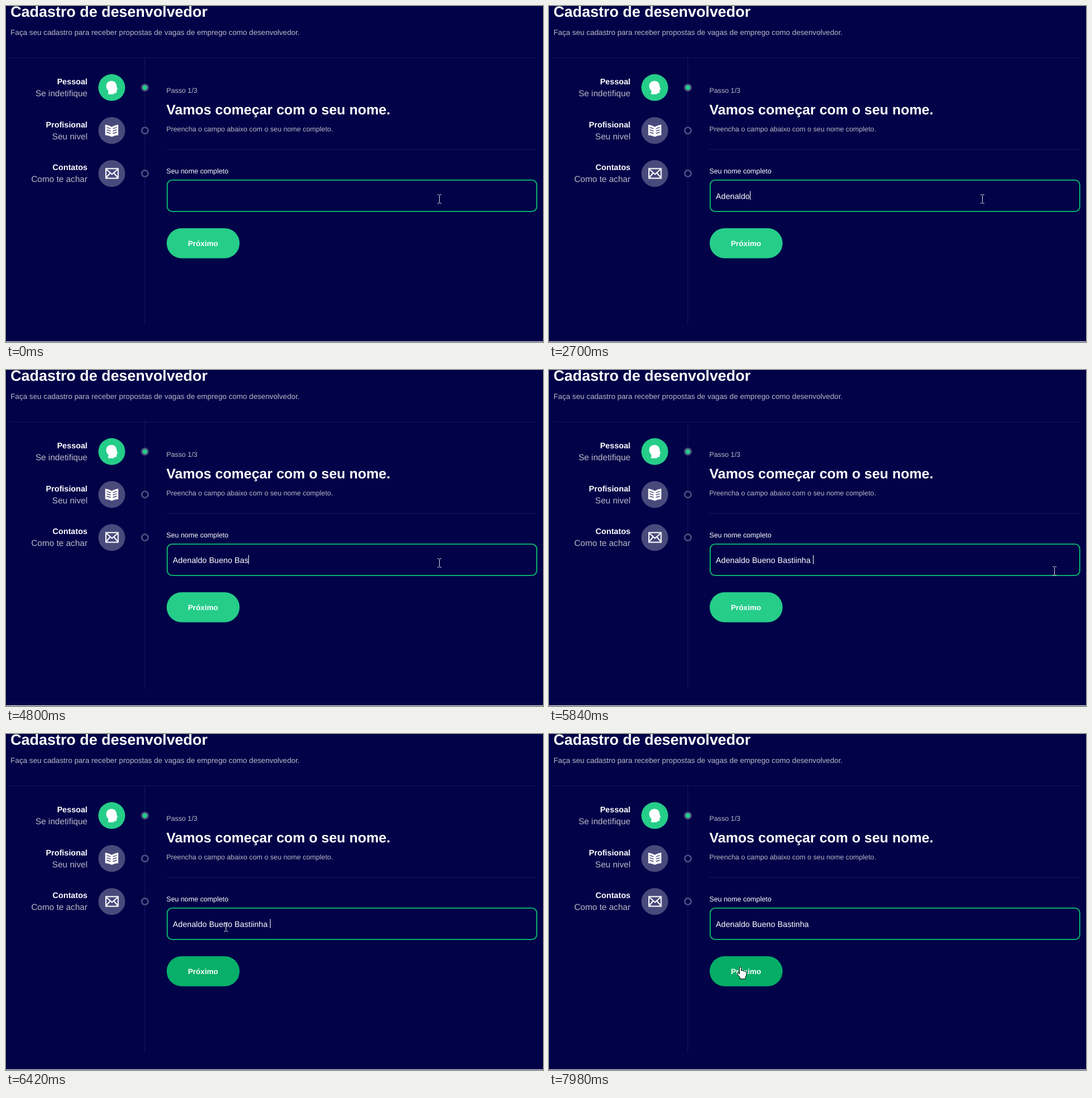
An HTML page that plays this animation: 946 px wide and 592 px high, repeating every 8 s.

```html
<!DOCTYPE html>
<html lang="pt-BR">
<head>
<meta charset="utf-8">
<title>Cadastro</title>
<style>
  html, body { margin: 0; width: 100%; height: 100%; overflow: hidden; background: #010248; }
  svg { display: block; width: 946px; height: 592px; }
  text { font-family: "Liberation Sans", Arial, sans-serif; fill: #fff; white-space: pre; text-rendering: geometricPrecision; }
  .b { font-weight: bold; }
  .soft { fill: #b9b9c6; }
  .end { text-anchor: end; }
  .rule { fill: #16195c; }
</style>
</head>
<body>
<svg viewBox="0 0 946 592">
  <rect width="946" height="592" fill="#010248"/>
  <rect y="591" width="946" height="1" fill="#fff"/>
  <rect class="rule" x="8" y="91" width="928" height="1"/>
  <rect class="rule" x="244" y="92" width="1" height="470"/>
  <rect class="rule" x="283" y="252" width="653" height="1"/>

  <text class="b" x="8" y="19" font-size="26.46">Cadastro de desenvolvedor</text>
  <text class="soft" x="8" y="51" font-size="13.23">Faça seu cadastro para receber propostas de vagas de emprego como desenvolvedor.</text>

  <g id="steps"></g>
  <path fill="#fff" d="M186 132C180 132 176.5 136 176.5 141C176.5 144.500 178 147.500 180.500 149.500L179.800 155.500H190L190.500 153.500H193C194.500 153.500 195 152.500 195 151L195.200 147.500L196.800 146.500L195 142C195 136 191.500 132 186 132Z"/>
  <g transform="translate(186.300 219.400)">
    <path fill="#fff" d="M-11.500 -10.500Q-5 -9.500 0 -6.500Q5 -9.500 11.500 -10.500V8Q5 8.500 0 11Q-5 8.500 -11.500 8Z"/>
    <path fill="none" stroke="#494a7c" stroke-width="1.500" d="M-9 -5.500L-2 -3.300M-9 -1.300L-2 .9M-9 2.900L-2 5.100M9 -5.500L2 -3.300M9 -1.300L2 .9M9 2.900L2 5.100"/>
  </g>
  <path fill="none" stroke="#fff" stroke-width="2" d="M176 286.500H197.500V303.500H176ZM176 287L186.750 296.500L197.500 287M176 303L183.500 294M197.500 303L190 294"/>

  <text class="soft" x="282.500" y="153" font-size="12.290">Passo 1/3</text>
  <text class="b" x="282.500" y="191" font-size="24.570">Vamos começar com o seu nome.</text>
  <text class="soft" x="282.500" y="221" font-size="12.290">Preencha o campo abaixo com o seu nome completo.</text>
  <text x="282.500" y="295" font-size="12.290">Seu nome completo</text>

  <rect x="284" y="306.700" width="651" height="55.300" rx="8.500" fill="none" stroke="#09ad6c" stroke-width="2"/>
  <text id="name" x="293.800" y="339.500" font-size="14.180"></text>
  <rect id="caret" y="326" width="1" height="16" fill="#fff"/>

  <rect id="button" x="283" y="391.500" width="128.500" height="53" rx="26.500"/>
  <text class="b" x="347" y="422.800" font-size="13.290" text-anchor="middle">Próximo</text>

  <g id="pointer">
    <path id="beam" fill="none" stroke="#ddd" d="M-3.500 -7.500H-1L0 -6.500L1 -7.500H3.500M0 -6.500V6.500M-3.500 7.500H-1L0 6.500L1 7.500H3.500"/>
    <path id="hand" fill="#fff" stroke="#000" stroke-linejoin="round" d="M-1.500 1Q0 -1 1.500 1V7Q3.300 5.800 4.500 7.500Q6.500 6.500 7.500 8.300Q9.500 7.300 10.700 9.500V15L9 18.500V21.500H-.5V19L-5.500 12.500Q-6 10.500 -4 10.500L-1.500 13Z"/>
    <path id="arrow" fill="#fff" stroke="#000" stroke-width=".8" d="M0 0V16L3.700 12.600L6 18.300L8.400 17.300L6 11.700H11Z"/>
  </g>
</svg>
<script>
const LOOP = 8000;
const $ = id => document.getElementById(id);

const steps = [
  ["Pessoal", "Se indetifique"],
  ["Profisional", "Seu nivel"],
  ["Contatos", "Como te achar"]
];
$("steps").innerHTML = steps.map(([title, note], i) => {
  const y = 143.7 + i * 75.7;
  const on = i === 0;
  return `<text class="b end" x="143.500" y="${y - 5.7}" font-size="14.180">${title}</text>
    <text class="soft end" x="143.500" y="${y + 15.3}" font-size="15.120">${note}</text>
    <circle cx="186.300" cy="${y}" r="23.600" fill="${on ? "#25cd89" : "#494a7c"}"/>
    <circle cx="244.700" cy="${y}" r="5.600" fill="${on ? "#25cd89" : "#010248"}" stroke="#494a7c" stroke-width="2.800"/>`;
}).join("");

// Each burst: keys typed, first time, gap; "<" is backspace.
const bursts = [
  ["Ade", 1940, 80], ["naldo", 2280, 105], [" ", 2860, 0], ["B", 3060, 0],
  ["une", 3260, 110], ["<", 3740, 0], ["<eno ", 3880, 90],
  ["Ba", 4560, 80], ["s", 4800, 0], ["tiin", 5000, 100], ["ha ", 5480, 70]
];
const keys = bursts.flatMap(([s, start, gap]) => [...s].map((k, i) => [start + i * gap, k]));
const FIX = 7180, CLICK = 6580;

const ctx = document.createElement("canvas").getContext("2d");
ctx.font = '14.18px "Liberation Sans", Arial, sans-serif';
ctx.textRendering = "geometricPrecision";

function typed(t) {
  let s = "";
  for (const [at, k] of keys) {
    if (t < at) break;
    s = k === "<" ? s.slice(0, -1) : s + k;
  }
  return s;
}

function caretOn(t) {
  if (t < 1720) return (t >= 40 && t < 460) || (t >= 860 && t < 1300);
  return t < 7440;
}

// Piecewise linear track of [time, ...values].
function track(points, t) {
  if (t <= points[0][0]) return points[0].slice(1);
  for (let i = 1; i < points.length; i++) {
    const a = points[i - 1], b = points[i];
    if (t < b[0]) {
      const p = (t - a[0]) / (b[0] - a[0]);
      return a.slice(1).map((v, j) => v + (b[j + 1] - v) * p);
    }
  }
  return points[points.length - 1].slice(1);
}

const path = [
  [5780, 763, 340], [5840, 890.5, 355], [5920, 884, 352], [6000, 837, 349],
  [6120, 645, 415], [6220, 430, 482], [6280, 345, 489], [6340, 358, 447],
  [6380, 377, 372], [6420, 387.5, 341], [6540, 428, 340], [6620, 437, 339],
  [6840, 441.5, 336], [7430, 441.5, 336], [7520, 428, 348], [7640, 385, 385],
  [7740, 350, 405], [7860, 337.5, 410.5]
];
const hoverPath = [
  [6320, 0], [6370, 1], [6410, 1], [6580, 0], [7660, 0], [7800, 1]
];

function pointerKind(x, y) {
  if (x > 283 && x < 936 && y > 306 && y < 363) return "beam";
  if (x > 283 && x < 411.5 && y > 391 && y < 445) return "hand";
  return "arrow";
}

function draw(t) {
  let text = typed(t);
  let caretAt = text.length;
  if (t >= CLICK) caretAt = text.lastIndexOf("i") + 1;
  if (t >= FIX) {
    text = text.replace("ii", "i");
    caretAt--;
  }
  $("name").textContent = text;
  const w = ctx.measureText(text.slice(0, caretAt)).width;
  $("caret").setAttribute("x", Math.round(293.8 + w));
  $("caret").style.display = caretOn(t) ? "" : "none";

  const [h] = track(hoverPath, t);
  const mix = (a, b) => Math.round(a + (b - a) * h);
  $("button").setAttribute("fill", `rgb(${mix(37, 6)},${mix(205, 173)},${mix(137, 103)})`);

  const [x, y] = track(path, t);
  const kind = pointerKind(x, y);
  for (const id of ["beam", "hand", "arrow"]) $(id).style.display = id === kind ? "" : "none";
  const snap = kind === "beam" ? 0.5 : 0;
  $("pointer").setAttribute("transform", `translate(${Math.floor(x) + snap} ${Math.floor(y)})`);
}

const start = performance.now();
function frame() {
  draw((performance.now() - start) % LOOP);
  requestAnimationFrame(frame);
}
draw(0);
requestAnimationFrame(frame);
</script>
</body>
</html>
```
